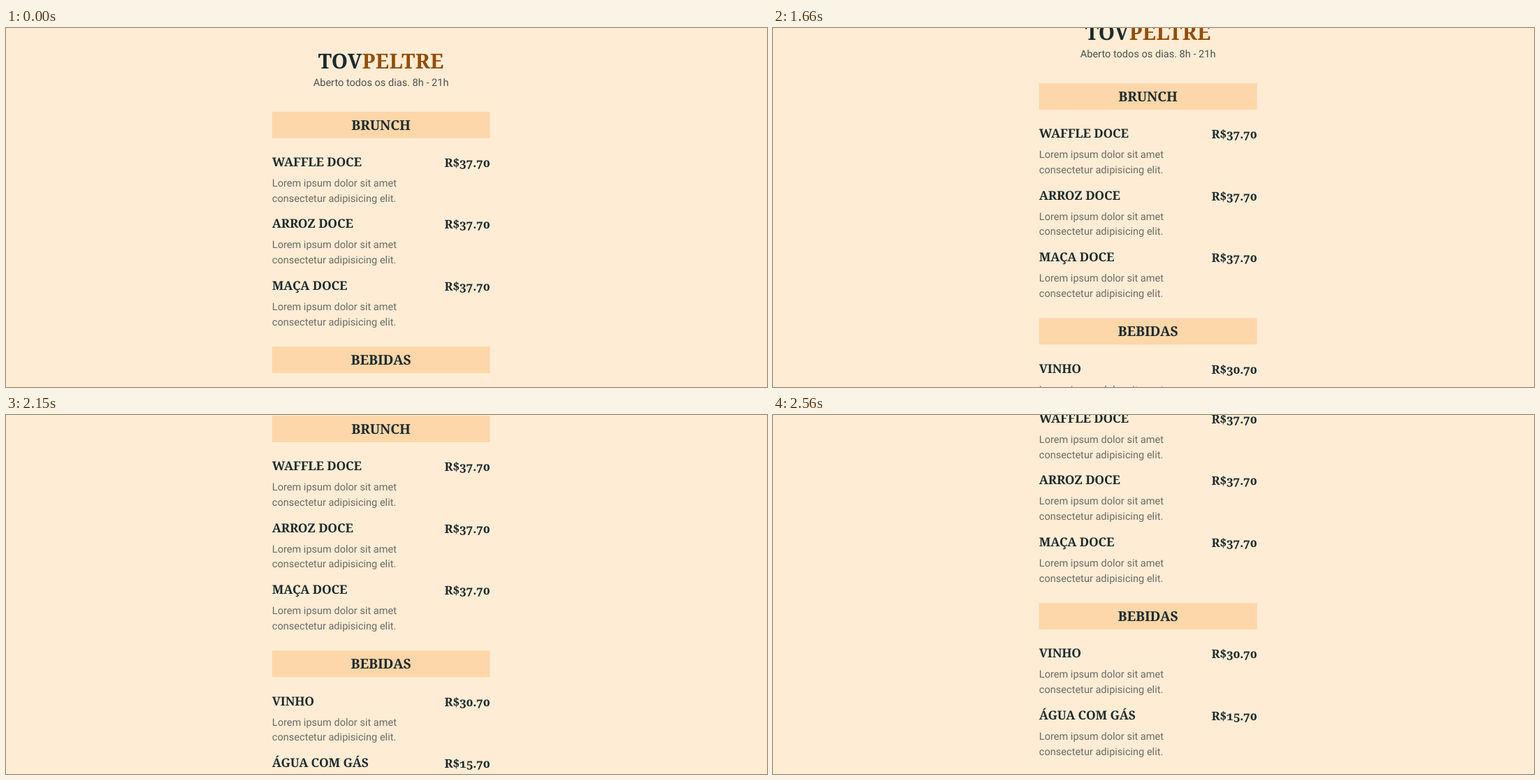
An HTML page that plays this animation: 1089 by 514 pixels, repeating every 3350 ms.

```html
<!DOCTYPE html>
<html lang="pt">
<head>
<meta charset="utf-8">
<title>Cardápio</title>
<style>
  html, body { margin: 0; width: 100%; height: 100%; overflow: hidden; background: #feecd4; }
  svg { display: block; width: 1089px; height: 514px; text-rendering: geometricPrecision; }
  text { font: bold 17.5px "Noto Serif", serif; letter-spacing: -.2px; fill: #1b2a2d; }
  .logo { font-size: 29.6px; letter-spacing: .3px; }
  .logo tspan { fill: #944c03; }
  .mid { text-anchor: middle; }
  .head { font-size: 19.4px; letter-spacing: -.1px; }
  .price { font-size: 17px; text-anchor: end; font-variant-numeric: oldstyle-nums; }
  .body { font: 14.57px Roboto, sans-serif; letter-spacing: 0; fill: #1b2a2d; fill-opacity: .66; }
  .open { fill-opacity: .8; }
</style>
</head>
<body>
<svg viewBox="0 0 1089 514"><g id="page"></g></svg>
<script>
const LEFT = 380.8, RIGHT = 692.5, MID = 536.6;
const LOOP = 3350, START = 1250, STEP = 69, STEPS = 20;
const page = document.getElementById('page');

const text = (x, y, cls, s) => `<text x="${x}" y="${y}" class="${cls}">${s}</text>`;

const item = (y, name, price) =>
  text(LEFT, y, '', name) +
  text(RIGHT, y + 1, 'price', 'R$' + price) +
  text(LEFT, y + 29, 'body', 'Lorem ipsum dolor sit amet') +
  text(LEFT, y + 50.9, 'body', 'consectetur adipisicing elit.');

const section = (y, title, items) =>
  `<rect x="${LEFT}" y="${y}" width="${RIGHT - LEFT}" height="37.8" fill="#fdd6a9"/>` +
  text(MID, y + 26, 'mid head', title) +
  items.map(([name, price], i) => item(y + 78.2 + i * 88.3, name, price)).join('');

page.innerHTML =
  text(MID, 58.3, 'mid logo', 'TOV<tspan>PELTRE</tspan>') +
  text(MID, 82.9, 'mid body open', 'Aberto todos os dias. 8h - 21h') +
  section(119.9, 'BRUNCH', [['WAFFLE DOCE', '37.70'], ['ARROZ DOCE', '37.70'], ['MAÇA DOCE', '37.70']]) +
  section(456.2, 'BEBIDAS', [['VINHO', '30.70'], ['ÁGUA COM GÁS', '15.70']]);

// Scroll distance at some steps, linear in between
const keys = [[-1, 0], [0, 8.4], [4, 32.6], [8, 65.6], [11, 91.3], [15, 146.3], [19, 187]];

function scrollAt(t) {
  if (t < START) return 0;
  const n = Math.min(STEPS - 1, Math.floor((t - START + 2) / STEP));
  const i = keys.findIndex(k => k[0] >= n);
  const [n0, y0] = keys[i - 1], [n1, y1] = keys[i];
  return y0 + (y1 - y0) * (n - n0) / (n1 - n0);
}

function frame() {
  page.setAttribute('transform', `translate(0 ${-scrollAt(performance.now() % LOOP)})`);
  requestAnimationFrame(frame);
}
frame();
</script>
</body>
</html>
```
